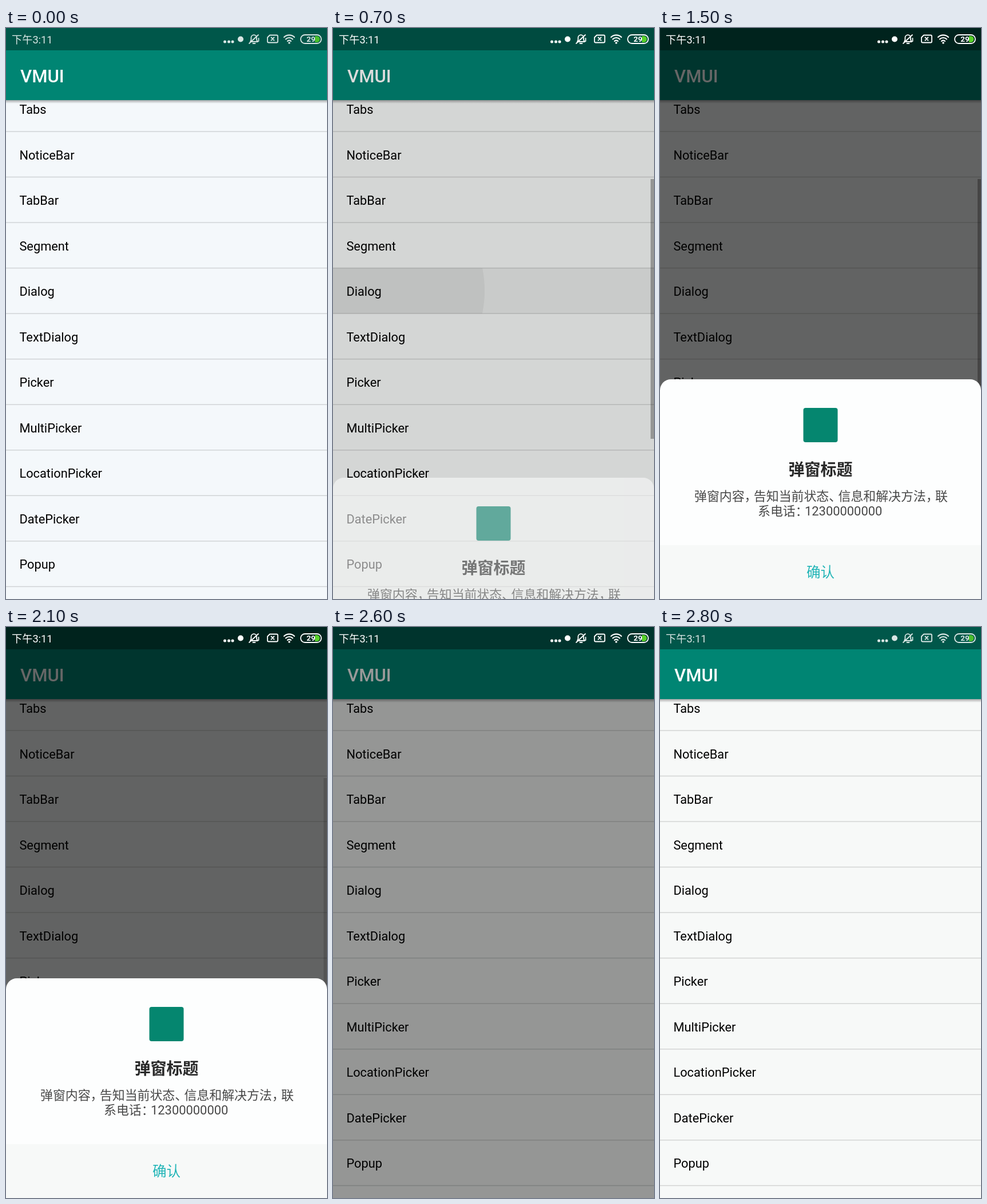
An HTML page that plays this animation: 561x998 px, repeating every 2.9 s.

```html
<!DOCTYPE html>
<html lang="zh-CN">
<head>
<meta charset="utf-8">
<style>
  html, body { margin: 0; width: 100%; height: 100%; overflow: hidden; }
  svg { display: block; width: 561px; height: 998px; font-family: Roboto, "Noto Sans CJK SC", "Noto Sans CJK", sans-serif; }
  .line { fill: none; stroke: #fff; stroke-width: 1.8; stroke-linecap: round; stroke-linejoin: round; }
  .body { font-size: 21.9px; fill: #484848; }
</style>
</head>
<body>
<svg viewBox="0 0 561 998">
  <defs>
    <linearGradient id="shade" x2="0" y2="1">
      <stop stop-opacity=".32"/>
      <stop offset="1" stop-opacity="0"/>
    </linearGradient>
    <clipPath id="row"><rect y="419.4" width="561" height="79.5"/></clipPath>
  </defs>

  <rect id="page" width="561" height="998"/>
  <g id="press" clip-path="url(#row)">
    <rect y="419" width="561" height="80" fill-opacity=".05"/>
    <circle id="ripple" cx="65" cy="459" fill-opacity=".05"/>
  </g>
  <g id="list" font-size="21.8"></g>
  <rect id="scrollbar" x="555" y="264" width="6" height="454"/>

  <rect y="126" width="561" height="6" fill="url(#shade)"/>
  <rect width="561" height="126" fill="#008573"/>
  <rect width="561" height="39" fill="#00574a"/>
  <text x="25" y="95" font-size="31.2" font-weight="500" fill="#fff">VMUI</text>

  <rect id="dim" width="561" height="998"/>

  <g id="status" fill="#fff">
    <text x="10" y="27" font-size="18.2">下午3:11</text>
    <circle cx="382.5" cy="24" r="2.5"/>
    <circle cx="389.5" cy="24" r="2.5"/>
    <circle cx="396" cy="24" r="2.5"/>
    <circle cx="410" cy="19.5" r="5"/>
    <g class="line">
      <path d="M427 24h13l-2-3v-4a4.800 4.800 0 0 0-9.600 0v4zM431.500 27h4M425 27l16-15M441.500 18v5"/>
      <path d="M461 12.500h12a2 2 0 0 1 2 2v9a2 2 0 0 1-2 2h-14a2 2 0 0 1-2-2v-7zM463.500 16.500l5 5m0-5l-5 5"/>
      <path stroke-width="2.2" d="M486 16a13 13 0 0 1 18 0M489 19.500a8.500 8.500 0 0 1 12 0M492 23a4 4 0 0 1 6 0"/>
      <rect x="515" y="12" width="36" height="15" rx="7.5"/>
    </g>
    <circle cx="495" cy="26" r="1.8"/>
    <path fill="#58d129" d="M540 14h3a5.500 5.500 0 0 1 0 11h-3z"/>
    <text x="533" y="24.300" font-size="13.500" font-weight="700" text-anchor="middle">29</text>
  </g>

  <g id="sheet">
    <path fill="#fdfefe" d="M0 998V633a19 19 0 0 1 19-19H542a19 19 0 0 1 19 19V998z"/>
    <rect y="904" width="561" height="94" fill="#f7f9f8"/>
    <rect x="250.500" y="664" width="60" height="60" rx="4" fill="#05866f"/>
    <g text-anchor="middle">
      <text x="280.500" y="782" font-size="28" font-weight="700" fill="#2a2a2a">弹窗标题</text>
      <text x="280.500" y="960" font-size="24.500" fill="#22b5b7">确认</text>
    </g>
    <text class="body" x="60" y="826">弹窗内容，<tspan dx="-5.600">告知当前状态、</tspan><tspan dx="-5.600">信息和解决方法，</tspan><tspan dx="-5.600">联</tspan></text>
    <text class="body" x="171" y="852">系电话：<tspan dx="-5.600">12300000000</tspan></text>
  </g>
</svg>
<script>
const el = id => document.getElementById(id);
const set = (id, attrs) => {
  for (const key in attrs) el(id).setAttribute(key, attrs[key]);
};
const ramp = (t, from, to) => Math.min(1, Math.max(0, (t - from) / (to - from)));
const ease = x => (1 - Math.cos(Math.PI * x)) / 2;

const items = ["Tabs", "NoticeBar", "TabBar", "Segment", "Dialog", "TextDialog",
  "Picker", "MultiPicker", "LocationPicker", "DatePicker", "Popup"];
el("list").innerHTML = items.map((name, i) => {
  const bottom = 181 + i * 79.54;
  return `<text x="23.4" y="${bottom - 31}">${name}</text>
    <rect y="${bottom - 0.8}" width="561" height="1.5" fill-opacity=".15"/>`;
}).join("");

function draw(t) {
  const shown = ease(ramp(t, 540, 840)) - ease(ramp(t, 2217, 2517));
  const dim = 0.6 * (ramp(t, 650, 865) - ramp(t, 2500, 2800));
  const touched = t >= 500;

  set("page", { fill: touched ? "#f7f9f8" : "#f4f8fb" });
  set("press", { opacity: ramp(t, 400, 600) * (1 - ramp(t, 700, 950)) });
  set("ripple", { r: Math.max(0, 200 + 0.45 * (t - 700)) });
  set("scrollbar", { "fill-opacity": touched ? 0.3 * (1 - ramp(t, 2000, 2200)) : 0 });
  set("dim", { "fill-opacity": dim });
  set("status", { opacity: t >= 600 && t < 2800 ? 1 : 0.85 });
  set("sheet", { opacity: shown, transform: `translate(0 ${384 * (1 - shown)})` });
}

// The picture is held for 100 ms at a time.
const start = performance.now();
function tick() {
  draw(Math.floor((performance.now() - start) % 2900 / 100) * 100);
  requestAnimationFrame(tick);
}
tick();
</script>
</body>
</html>
```
